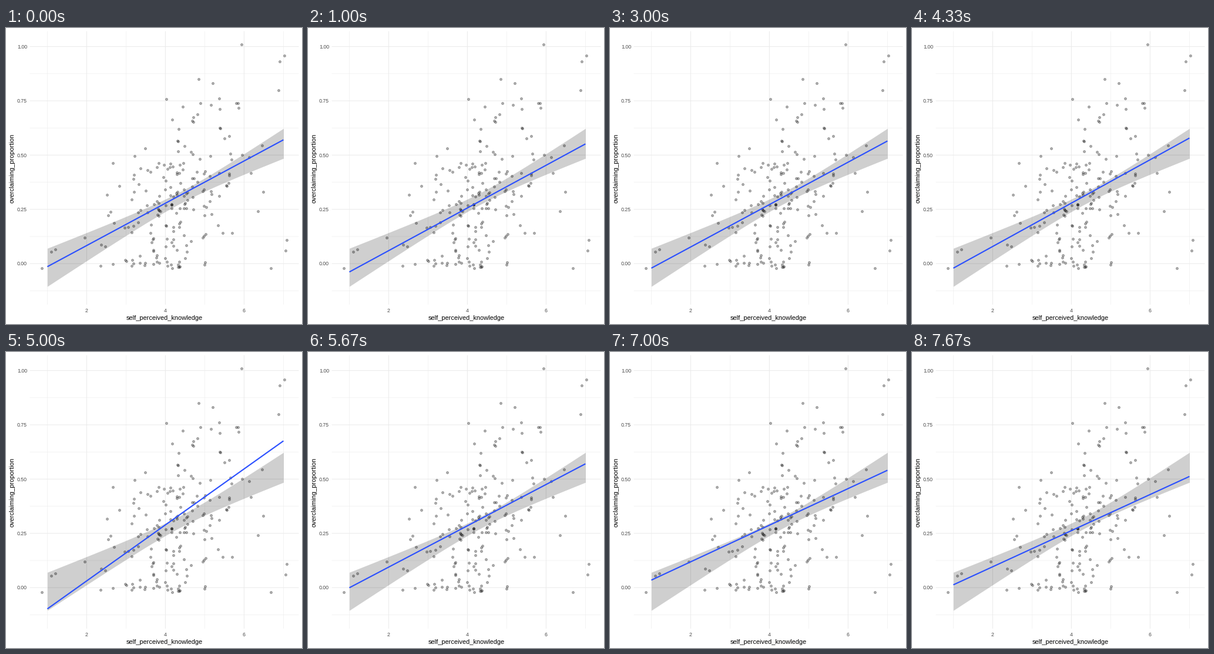
A matplotlib script that plays this animation: 504 by 504 pixels, repeating every 8 s.

```python
import numpy as np
import matplotlib.pyplot as plt
from matplotlib.animation import FuncAnimation

SIZE = 504
INTERVAL = 20
LOOP = 8000
PANEL_LEFT, PANEL_RIGHT = 40.5, 498.5
PANEL_TOP, PANEL_BOTTOM = 5.5, 471

plt.rcParams["font.family"] = "Liberation Sans"


def px_x(value):
    return 3.4 + 67 * value


def px_y(value):
    return 401.2 - 369.6 * value


def mean_fit(x):
    return -0.0175 + 0.0952 * (x - 1)


fig = plt.figure(figsize=(7, 7), dpi=72, facecolor="white")
ax = fig.add_axes([0, 0, 1, 1])
ax.set_xlim(0, SIZE)
ax.set_ylim(SIZE, 0)
ax.axis("off")


def grid(xs, ys, width):
    style = dict(color="#ebebeb", lw=width, zorder=1, snap=False)
    ax.vlines([px_x(x) for x in xs], PANEL_TOP, PANEL_BOTTOM, **style)
    ax.hlines([px_y(y) for y in ys], PANEL_LEFT, PANEL_RIGHT, **style)


x_ticks, y_ticks = (2, 4, 6), (0, 0.25, 0.5, 0.75, 1)
grid((1, 3, 5, 7), np.arange(-0.125, 1, 0.25), 0.55)
grid(x_ticks, y_ticks, 1.07)

tick_style = dict(fontsize=8.8, color="#4d4d4d", va="baseline")
for x in x_ticks:
    ax.text(px_x(x), 484.5, str(x), ha="center", **tick_style)
for y in y_ticks:
    ax.text(36, px_y(y) + 3.2, f"{y:.2f}", ha="right", **tick_style)
ax.text(269.5, 496.8, "self_perceived_knowledge", fontsize=11,
        ha="center", va="baseline")
ax.text(11, 238.5, "overclaiming_proportion", fontsize=11,
        rotation=90, ha="center", va="center")

# Noisy answers around the mean fit, on a jittered score scale
rng = np.random.default_rng(7)
count = 194
scores = np.round(np.clip(rng.normal(4.4, 0.95, count), 2.4, 6.1) * 6) / 6
answers = np.clip(mean_fit(scores) + rng.normal(0, 0.21, count), 0, 0.75)
cloud = np.column_stack([scores + rng.uniform(-0.06, 0.06, count),
                         answers + rng.uniform(-0.02, 0.02, count)])
outliers = [
    (0.86, -0.02), (1.1, 0.055), (1.2, 0.065), (1.95, 0.12),
    (4.84, 0.85), (5.2, 0.83), (5.94, 1.01), (6.87, 0.8),
    (6.91, 0.93), (7.02, 0.957), (6.45, 0.545), (6.48, 0.33),
    (6.35, 0.24), (6.68, -0.02), (7.06, 0.06), (7.08, 0.11),
]
xs, ys = np.vstack([cloud, outliers]).T
ax.scatter(px_x(xs), px_y(ys), s=3.92 ** 2, lw=0.94, zorder=2,
           facecolor=(0, 0, 0, 0.3), edgecolor=(0, 0, 0, 0.3))

# The 95% band is a hyperbola, narrowest at the mean score
band_x = np.linspace(1, 7, 81)
half = np.hypot(0.027, 0.0245 * (band_x - 4.41))
fit = mean_fit(band_x)
ax.fill_between(px_x(band_x), px_y(fit - half), px_y(fit + half),
                color="black", alpha=0.19, lw=0, zorder=3)

# Heights of both line ends, one pair per sampled fit
draws = [
    (406, 190), (435, 182), (415, 197), (419, 188), (420, 196),
    (408.5, 192), (420, 166), (408.5, 187), (437, 151), (401, 190),
    (410, 206), (388, 201), (396, 211.5),
]
line, = ax.plot(px_x(np.array([1, 7])), draws[0], color="#2b50ff", lw=2.13,
                solid_capstyle="butt", zorder=4)


def update(frame):
    # A new fit every two thirds of a second, the first one held for half that
    step = (frame * INTERVAL - 320) * 3 // 2000 + 1
    line.set_ydata([y + 0.4 for y in draws[step]])
    return line,


anim = FuncAnimation(fig, update, frames=LOOP // INTERVAL, interval=INTERVAL,
                     repeat=True, repeat_delay=0)
plt.show()
```
